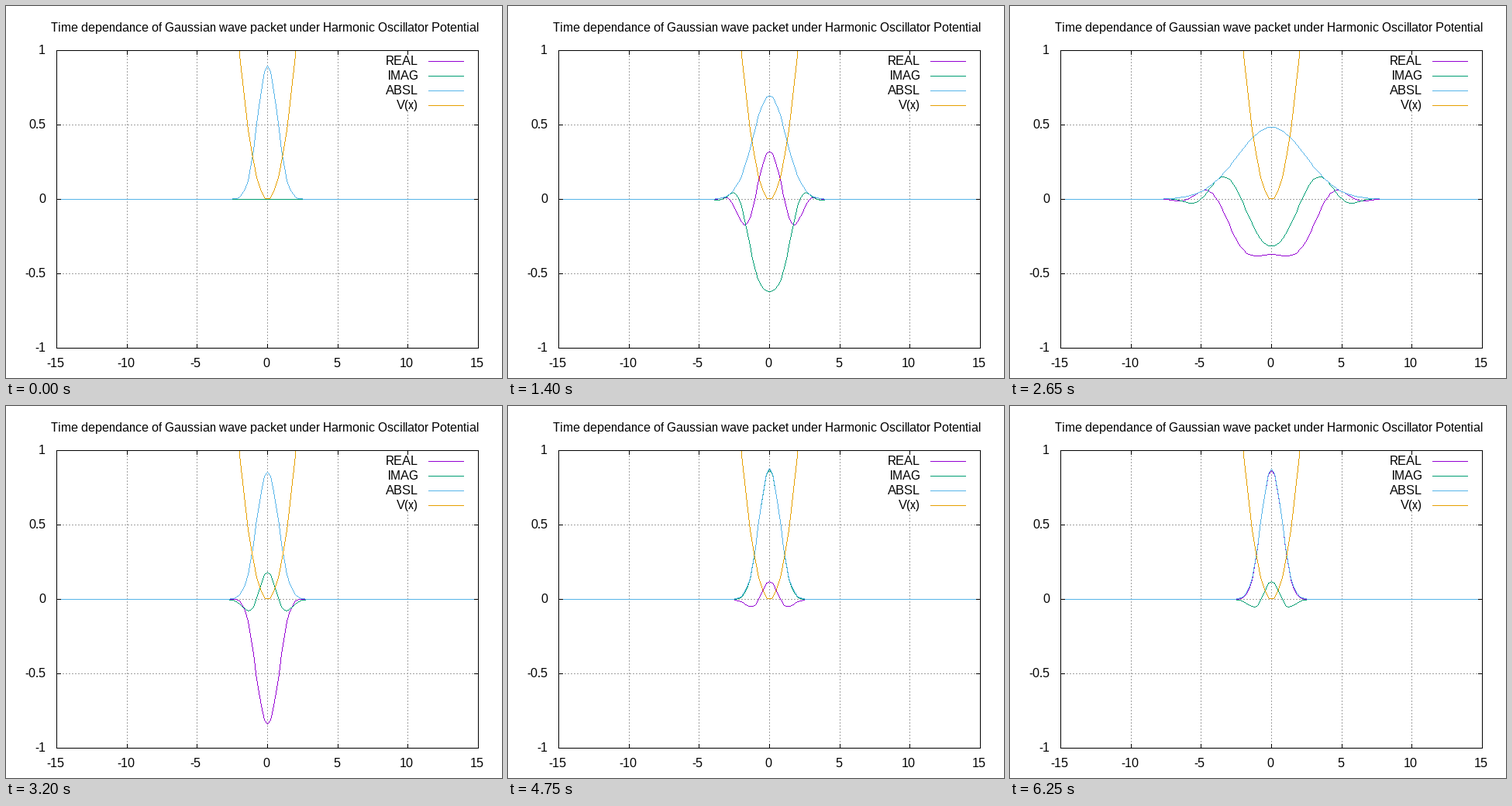
These frames come from a looping animation (640x480 px, 6.3 s). A matplotlib script:

```python
import numpy as np
import matplotlib.pyplot as plt
from matplotlib.animation import FuncAnimation

W, H, DPI = 640, 480, 100
PT = 72 / DPI                      # points per pixel
LEFT, RIGHT, TOP, BOTTOM = 65, 609, 57, 441
PURPLE, GREEN, BLUE, ORANGE = "#9400d3", "#009e73", "#56b4e9", "#e69f00"
GRAY = "#a0a0a0"
FRAMES, DT = 126, 0.1

plt.rcParams.update({
    "font.family": "Liberation Sans",
    "path.simplify": False,
    "text.hinting": "native",
    "text.hinting_factor": 1,
})


def px(x):
    return np.floor(LEFT + (np.asarray(x) + 15) / 30 * (RIGHT - LEFT) + 0.5)


def py(y):
    return np.floor(BOTTOM - (np.asarray(y) + 1) / 2 * (BOTTOM - TOP) + 0.5)


def raster(x, y):
    """Hard-edged polyline as a run of one-pixel dashes."""
    steps = np.maximum(np.abs(np.diff(x)), np.abs(np.diff(y)))
    knots = np.concatenate([[0], np.cumsum(steps)])
    s = np.arange(knots[-1] + 1)
    cx = np.floor(np.interp(s, knots, x) + 0.5)
    cy = np.floor(np.interp(s, knots, y) + 0.5) + 0.5
    gap = np.full(len(s), np.nan)
    return np.column_stack([cx, cx + 1, gap]).ravel(), np.repeat(cy, 3)


# Schroedinger equation with H = -d2/dx2 + x^2/4 on a grid
STEP, STRIDE = 0.05, 4
grid = np.arange(-300, 301) * STEP
off = np.full(len(grid) - 1, -1 / STEP**2)
ham = np.diag(2 / STEP**2 + grid**2 / 4) + np.diag(off, 1) + np.diag(off, -1)
energy, modes = np.linalg.eigh(ham)
coef = modes.T @ ((2 / np.pi) ** 0.25 * np.exp(-grid**2))
xs, shown = grid[::STRIDE], modes[::STRIDE]


def psi(t):
    return shown @ (np.exp(-1j * energy * t) * coef)


fig = plt.figure(figsize=(W / DPI, H / DPI), dpi=DPI, facecolor="white")
ax = fig.add_axes([0, 0, 1, 1])
ax.set_xlim(0, W)
ax.set_ylim(H, 0)
ax.axis("off")


def stroke(x, y, color, z, **kw):
    item, = ax.plot(x, y, color=color, lw=PT, snap=False, zorder=z,
                    solid_capstyle="butt", dash_capstyle="butt", **kw)
    return item


def line(x, y, color, z=3):
    return stroke(*raster(x, y), color, z)


def label(x, y, text, ha):
    ax.text(x, y, text, ha=ha, va="baseline", fontsize=16 * PT, color="black", zorder=8)


# Grid, ticks and frame
dots = dict(linestyle=(0, (2, 2)))
for v in range(-15, 16, 5):
    x = float(px(v))
    if abs(v) < 15:
        end = 137 if v == 10 else TOP
        stroke([x + 0.5] * 2, [BOTTOM + 1, end], GRAY, 1, **dots)
    line([x, x], [BOTTOM - 5, BOTTOM], "black", 6)
    line([x, x], [TOP, TOP + 5], "black", 6)
    label(x - 1.5, 466, str(v), "center")
for v in (-1, -0.5, 0, 0.5, 1):
    y = float(py(v))
    if abs(v) < 1:
        stroke([LEFT, RIGHT + 1], [y + 0.5] * 2, GRAY, 1, **dots)
    line([LEFT, LEFT + 5], [y, y], "black", 6)
    line([RIGHT - 5, RIGHT], [y, y], "black", 6)
    label(51, y + 5, f"{v:g}", "right")
line([LEFT, RIGHT, RIGHT, LEFT, LEFT], [TOP, TOP, BOTTOM, BOTTOM, TOP], "black", 7)

label(334.5, 33, "Time dependance of Gaussian wave packet under "
      "Harmonic Oscillator Potential", "center")

# Key
key = [("REAL", PURPLE), ("IMAG", GREEN), ("ABSL", BLUE), ("V(x)", ORANGE)]
for i, (name, color) in enumerate(key):
    y = 71 + 19 * i
    label(532, y + 5, name, "right")
    line([545, 590], [y, y], color)

# Curves
curves = [stroke([], [], c, 3) for c in (PURPLE, GREEN, BLUE)]
vx = np.linspace(-15, 15, 100)
vx = np.concatenate([[-2], vx[np.abs(vx) < 2], [2]])
line(px(vx), py(vx**2 / 4), ORANGE, 4)


def update(i):
    wave = psi(i * DT)
    for curve, part in zip(curves, (wave.real, wave.imag, np.abs(wave))):
        curve.set_data(*raster(px(xs), py(part)))
    return curves


anim = FuncAnimation(fig, update, frames=FRAMES, interval=50, repeat=True,
                     repeat_delay=0, init_func=lambda: update(0))
plt.show()
```
